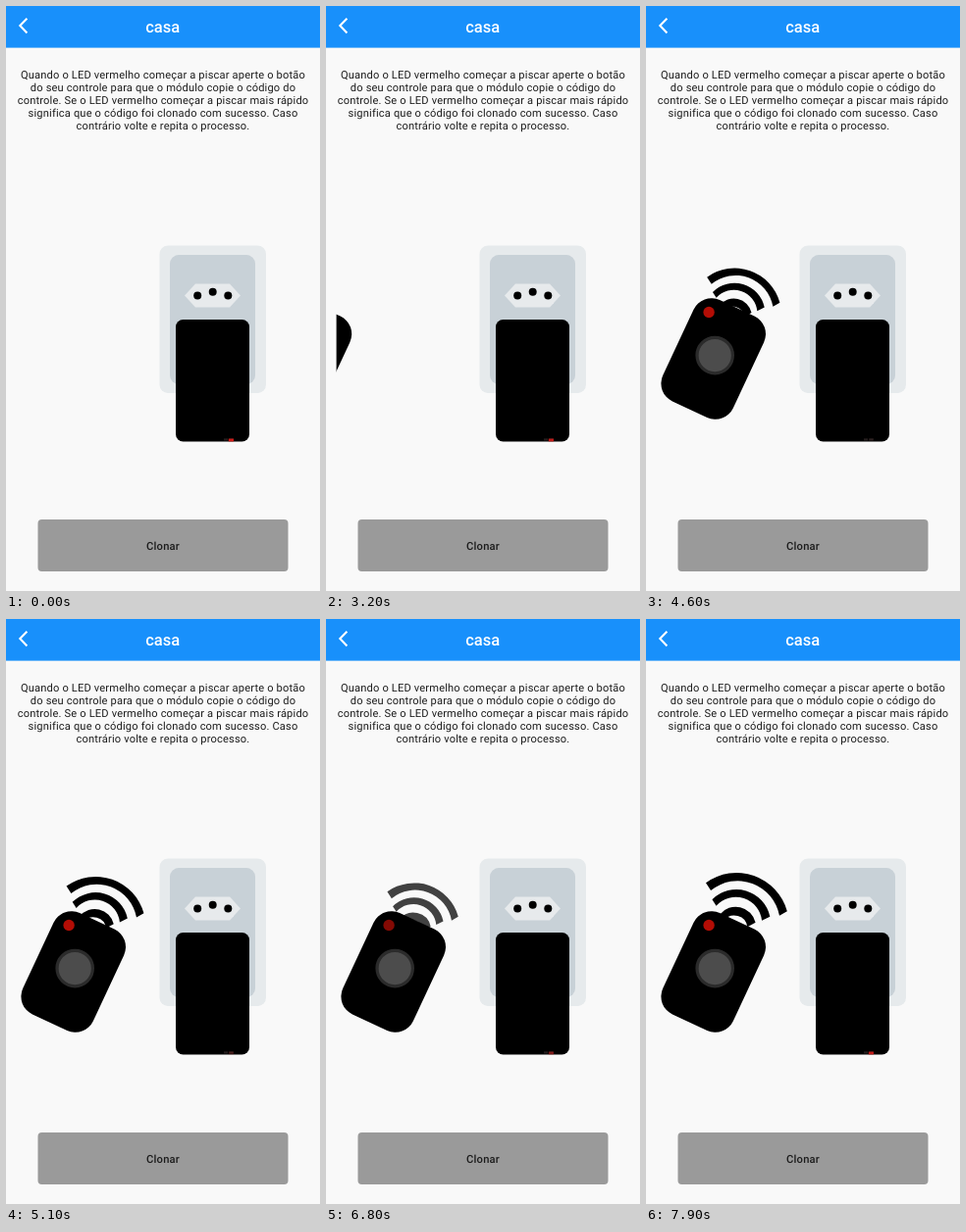
An HTML page for the animation above (8 s loop, 320x597 px).

```html
<!DOCTYPE html>
<html lang="pt-BR">
<head>
<meta charset="utf-8">
<title>casa</title>
<style>
  html, body { margin: 0; width: 100%; height: 100%; overflow: hidden; background: #f9f9f9; }
  svg { display: block; width: 320px; height: 597px; }
  text { font-family: Roboto, sans-serif; text-anchor: middle; text-rendering: geometricPrecision; fill: #1c1c1c; }
  .title { font-size: 16.5px; font-weight: 500; fill: #fff; }
  .body { font-size: 11.1px; letter-spacing: .17px; }
  .label { font-size: 11.2px; font-weight: 500; letter-spacing: .2px; }
</style>
</head>
<body>
<svg viewBox="0 0 320 597">
  <defs>
    <clipPath id="stage"><rect x="10.6" y="200" width="300" height="300"/></clipPath>
  </defs>
  <rect width="320" height="597" fill="#f9f9f9"/>

  <rect width="320" height="42.6" fill="#1890fb"/>
  <path d="M21.4 12.8 14.3 20.1 21.4 27.4" fill="none" stroke="#fff" stroke-width="2.1"/>
  <text class="title" x="159.7" y="26.5">casa</text>

  <g class="body">
    <text x="160" y="74">Quando o LED vermelho começar a piscar aperte o botão</text>
    <text x="160" y="87">do seu controle para que o módulo copie o código do</text>
    <text x="160" y="100">controle. Se o LED vermelho começar a piscar mais rápido</text>
    <text x="160" y="113">significa que o código foi clonado com sucesso. Caso</text>
    <text x="160" y="126">contrário volte e repita o processo.</text>
  </g>

  <!-- Outlet and module -->
  <rect x="156.5" y="244.5" width="108.5" height="150.5" rx="8.5" fill="#e6eaec"/>
  <rect x="167" y="254" width="87" height="132" rx="9" fill="#c8d1d7"/>
  <path d="M182 295.5 193 283.5H228L239 295.5 228 307.5H193Z" fill="#e7eaec"/>
  <circle cx="195.2" cy="295.6" r="4"/>
  <circle cx="210.7" cy="291.8" r="4"/>
  <circle cx="226.3" cy="295.6" r="4"/>
  <rect x="173" y="320" width="75" height="124.5" rx="7.5"/>
  <rect x="222" y="441.3" width="4" height="2.2" fill="#231c1c"/>
  <rect x="227.3" y="441.3" width="4.5" height="2.2" fill="#2b2020"/>
  <rect id="moduleLed" x="226.8" y="441.6" width="5.2" height="2.8" fill="#d41b17"/>

  <!-- Remote control -->
  <g clip-path="url(#stage)">
    <g id="waves">
      <path d="M60 263A58 58 0 0 1 150 294.5L141.5 299.5A47 47 0 0 0 65.5 271.5Z"/>
      <path d="M67 281.5A38 38 0 0 1 131 300.5L122 305A29 29 0 0 0 71.5 288.5Z"/>
      <path d="M75.5 298A22.5 22.5 0 0 1 115 307L106 312A14.5 14.5 0 0 0 80 305Z"/>
    </g>
    <g id="remote">
      <rect x="29.2" y="303" width="79" height="114" rx="20" transform="rotate(25 68.7 360)"/>
      <circle cx="70.2" cy="356.6" r="18.2" fill="#4c4c4c" stroke="#2b2b2b" stroke-width="3.2"/>
      <circle id="remoteLed" cx="64.1" cy="312.5" r="5.7" fill="#b30d05"/>
    </g>
  </g>

  <rect x="32.5" y="524" width="255" height="53" rx="4" fill="#9a9a9a"/>
  <text class="label" x="160" y="554.6">Clonar</text>
</svg>
<script>
  const LOOP = 8000;
  const SLIDE = { start: 3000, visible: 3200, end: 3950, gap: 96 };
  const SIGNAL = { start: 4100, period: 2480 };
  const [waves, remote, remoteLed, moduleLed] =
    ['waves', 'remote', 'remoteLed', 'moduleLed'].map(id => document.getElementById(id));

  const clamp = v => Math.min(1, Math.max(0, v));
  const ramp = (t, from, to) => clamp((t - from) / (to - from));
  const swell = p => (1 - Math.cos(2 * Math.PI * p)) / 2;

  // Slow uneven pulse at first, then a quicker one.
  function blink(t) {
    if (t >= 4000) return swell((t - 4000) / 590);
    if (t >= 3770) return 0;
    const p = (t + 780) % 810;
    const fall = 500;
    return p < fall ? swell(.5 + p / fall / 2) : swell((p - fall) / 310 / 2);
  }

  function slide(t) {
    if (t < SLIDE.start) return -200;
    const left = Math.max(0, (SLIDE.end - t) / (SLIDE.end - SLIDE.visible));
    return -SLIDE.gap * left ** 1.5;
  }

  function draw(t) {
    moduleLed.setAttribute('opacity', blink(t));
    remote.setAttribute('transform', `translate(${slide(t)} 0)`);

    const p = t < SIGNAL.start ? -1 : (t - SIGNAL.start) % SIGNAL.period;
    const on = ramp(p, 0, 300);
    waves.setAttribute('opacity', on * (1 - ramp(p, 1600, 1900)));
    remoteLed.setAttribute('opacity', on * (1 - ramp(p, 1580, 2020)));

    const u = (p - 720) / 1000;
    const size = .845 + .102 * u + .0385 * u * u;
    waves.setAttribute('transform', `translate(72.5 341) scale(${size}) translate(-72.5 -341)`);
  }

  const begin = performance.now();
  function tick(now) {
    draw(Math.max(0, now - begin) % LOOP);
    requestAnimationFrame(tick);
  }
  draw(0);
  requestAnimationFrame(tick);
</script>
</body>
</html>
```
